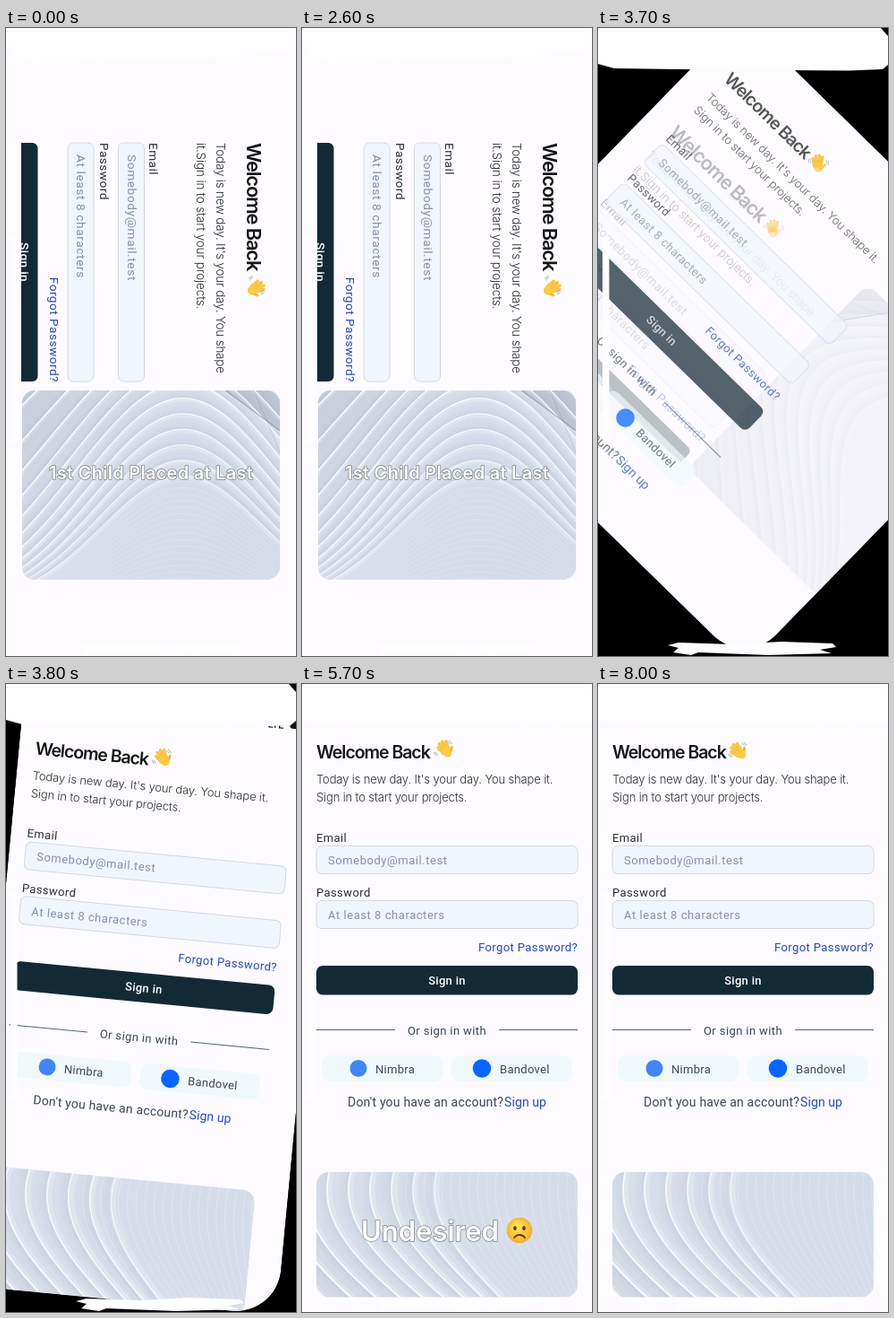
Animation, 324 px wide and 700 px high, one loop 8.1 s. Source, as an HTML page with a canvas:

```html
<!DOCTYPE html>
<html lang="en">
<head>
<meta charset="utf-8">
<title>Sign in screen rotation</title>
<style>
  html, body { margin: 0; width: 100%; height: 100%; overflow: hidden; background: #fdfbff; }
  canvas { display: block; width: 324px; height: 700px; }
</style>
</head>
<body>
<canvas id="stage"></canvas>
<script>
const W = 324, H = 700, LOOP = 8100;
const TURN_START = 3500, TURN_TIME = 400;
const canvas = document.getElementById('stage');
const dpr = window.devicePixelRatio || 1;
canvas.width = W * dpr;
canvas.height = H * dpr;
const ctx = canvas.getContext('2d');

const BG = '#fdfbff', PATCH = '#fefdff', INK = '#2b2e38', LINK = '#2449b4',
      NAVY = '#142936', HINT = '#8490a8', SLATE = '#3a465a';
const roboto = (size, weight = 400) => `${weight} ${size}px Roboto, sans-serif`;
const inter = (size, weight = 300) => `${weight} ${size}px Inter, sans-serif`;

function text(str, x, y, font, color, spacing = 0, align = 'left') {
  ctx.font = font;
  ctx.letterSpacing = spacing + 'px';
  ctx.textAlign = align;
  ctx.fillStyle = color;
  ctx.fillText(str, x, y);
}

function box(x, y, w, h, r, fill, border) {
  ctx.beginPath();
  ctx.roundRect(x, y, w, h, r);
  ctx.fillStyle = fill;
  ctx.fill();
  if (border) {
    ctx.strokeStyle = border;
    ctx.lineWidth = 1;
    ctx.stroke();
  }
}

function disc(x, y, r, fill) {
  ctx.beginPath();
  ctx.arc(x, y, r, 0, Math.PI * 2);
  ctx.fillStyle = fill;
  ctx.fill();
}

function line(x1, y1, x2, y2, width, color) {
  ctx.beginPath();
  ctx.moveTo(x1, y1);
  ctx.lineTo(x2, y2);
  ctx.lineWidth = width;
  ctx.strokeStyle = color;
  ctx.stroke();
}

function poly(points, fill) {
  ctx.beginPath();
  points.forEach(([x, y]) => ctx.lineTo(x, y));
  ctx.fillStyle = fill;
  ctx.fill();
}

function field(x, y, w, h, hint, baseline, size, spacing) {
  box(x, y, w, h, 6, '#f1f5fe', '#d3d8e4');
  text(hint, x + 13, baseline, roboto(size), HINT, spacing);
}

function hand(x, y, scale, t) {
  const sway = Math.cos(t / 433.3 * Math.PI * 2);
  ctx.save();
  ctx.translate(x + sway, y - 1.2 * sway);
  ctx.scale(scale, scale);
  ctx.save();
  ctx.translate(4, 8);
  ctx.rotate(sway * 0.16);
  ctx.translate(-4, -8);
  ctx.lineCap = 'round';
  const fingers = [[-7.4, -0.4], [-6.4, -5], [-3.4, -8], [0.8, -8.6]];
  fingers.forEach(([fx, fy], i) => {
    const px = -0.6 + i * 1.9, py = 5.6 - i * 1.7;
    line(px, py, fx, fy, 3.5, '#e9a52c');
    line(px, py, fx, fy, 2.8, '#ffc943');
  });
  line(7, 4, 8.6, -2.6, 3, '#f6b836');
  ctx.beginPath();
  ctx.ellipse(3.4, 4, 6, 5, 0.75, 0, Math.PI * 2);
  ctx.fillStyle = '#ffc943';
  ctx.fill();
  ctx.restore();
  ctx.lineCap = 'round';
  ctx.lineWidth = 0.8;
  ctx.strokeStyle = '#8b949d';
  for (const [r, from] of [[9.8, 2.3], [11.8, 2.4], [9.8, -1.05], [11.8, -0.95]]) {
    ctx.beginPath();
    ctx.arc(-0.5, 0, r, from, from + 0.4);
    ctx.stroke();
  }
  ctx.restore();
}

function frown(x, y) {
  const skin = ctx.createRadialGradient(x - 3, y - 5, 2, x, y, 15);
  skin.addColorStop(0, '#ffe45a');
  skin.addColorStop(1, '#f5ae2c');
  disc(x, y, 14.3, skin);
  for (const side of [-1, 1]) {
    ctx.beginPath();
    ctx.ellipse(x + side * 5, y - 2.5, 1.8, 2.5, 0, 0, Math.PI * 2);
    ctx.fillStyle = '#61380f';
    ctx.fill();
  }
  ctx.beginPath();
  ctx.arc(x, y + 12, 7, -Math.PI * 0.82, -Math.PI * 0.18);
  ctx.lineCap = 'round';
  ctx.lineWidth = 1.9;
  ctx.strokeStyle = '#61380f';
  ctx.stroke();
}

// Silky ribbons on a 292 x 400 sheet: each bows out from its crest
// and is squeezed towards the right-hand side.
function ribbon(start, shift, width, color) {
  ctx.beginPath();
  for (let y = 0; y <= 400; y += 5) {
    const bow = 380 * (0.8 + start / 250) * ((y - 150) / 250) ** 2;
    ctx.lineTo(330 - (330 - start) * Math.exp(-bow / 250) + shift, y);
  }
  ctx.lineWidth = width;
  ctx.strokeStyle = color;
  ctx.stroke();
}

function art() {
  const base = ctx.createLinearGradient(0, 400, 292, 60);
  base.addColorStop(0, '#c6ccd9');
  base.addColorStop(0.4, '#d9deea');
  base.addColorStop(1, '#d5dbea');
  ctx.fillStyle = base;
  ctx.fillRect(0, 0, 292, 400);
  poly([[0, 0], [62, 0], [0, 84]], 'rgba(150,158,176,.4)');
  ctx.lineCap = 'butt';
  for (let start = -132; start < 150; start += 24) {
    for (let k = 1; k < 6; k++) {
      ribbon(start, -k * 2.2, 3, `rgba(160,170,196,${0.15 - k * 0.025})`);
    }
    ribbon(start, 2.5, 6, 'rgba(255,255,255,.2)');
    ribbon(start, 0, 1.8 - start / 250, 'rgba(255,255,255,.8)');
  }
  for (let start = 90; start < 330; start += 10) {
    ribbon(start, 0, 0.9, 'rgba(255,255,255,.28)');
  }
  line(0, 84, 62, 0, 1.6, 'rgba(125,133,152,.6)');
  line(0, 40, 95, 0, 1, 'rgba(130,138,160,.4)');
}

function card(x, y, w, h, scale, offset) {
  ctx.save();
  ctx.beginPath();
  ctx.roundRect(x, y, w, h, 14);
  ctx.clip();
  ctx.translate(x, y);
  ctx.scale(scale, scale);
  ctx.translate(0, -offset);
  art();
  ctx.restore();
}

const MAIL = 'Somebody@mail.test', PASS = 'At least 8 characters';

function portrait(t) {
  text('••• LTE', 258, 28, roboto(11, 500), '#111');
  box(297, 18, 20, 9, 3, '#111');
  text('Welcome Back', 16, 83, inter(19.5, 600), '#14161c', -1.05);
  hand(158, 73, 0.95, t);
  text("Today is new day. It's your day. You shape it.", 16, 111, inter(13), INK, -0.14);
  text('Sign in to start your projects.', 16, 131, inter(13), INK, -0.14);
  text('Email', 16, 175.5, roboto(13), INK, 0.4);
  field(16, 180.5, 292, 31, MAIL, 200.5, 13, 0.55);
  text('Password', 16, 237, roboto(13), INK, 0.4);
  field(16, 241.5, 292, 31, PASS, 262, 13, 0.55);
  text('Forgot Password?', 308, 298, roboto(13), LINK, 0.4, 'right');
  box(16, 314, 292, 32.5, 7, NAVY);
  text('Sign in', 162, 335, roboto(13, 500), '#fff', 0.3, 'center');
  ctx.lineCap = 'butt';
  line(16, 385.5, 104, 385.5, 1, '#536773');
  line(220, 385.5, 308, 385.5, 1, '#536773');
  text('Or sign in with', 118, 390.5, roboto(13), SLATE, 0.4);
  box(22, 414, 135, 29, 9, '#f1f8fc');
  box(167, 414, 135, 29, 9, '#f1f8fc');
  disc(63, 428.5, 9.5, '#4285f4');
  disc(201, 428.5, 10.3, '#0866ff');
  text('Nimbra', 82, 433.5, roboto(13), SLATE, 0.3);
  text('Bandovel', 221, 433.5, roboto(13), SLATE, 0.3);
  text("Don't you have an account?", 51, 471, roboto(14), SLATE, 0.2);
  text('Sign up', 226, 471, roboto(14), LINK, 0.1);
  card(16, 544, 292, 139.5, 1, 130);
}

function landscape(t) {
  text('Welcome Back', 128, 55, inter(21.9, 600), '#14161c', -1.18);
  hand(287, 46, 0.97, t);
  text("Today is new day. It's your day. You shape", 128, 89.5, inter(13.4), INK, -0.18);
  text('it.Sign in to start your projects.', 128, 111.5, inter(13.4), INK, -0.1);
  text('Email', 128, 164, roboto(13.7), INK, 0.42);
  field(128, 169.5, 266, 29, MAIL, 188.5, 13.7, 0.6);
  text('Password', 128, 219.5, roboto(13.7), INK, 0.42);
  field(128, 226, 266, 29, PASS, 245, 13.7, 0.6);
  text('Forgot Password?', 395, 275.5, roboto(13.7), LINK, 0.45, 'right');
  ctx.save();
  ctx.beginPath();
  ctx.rect(0, 0, 700, 307);
  ctx.clip();
  box(128, 288.5, 266, 33, 6, NAVY);
  text('Sign in', 261, 308.5, roboto(13.7, 500), '#fff', 0.35, 'center');
  ctx.restore();
  card(404, 18, 211, 288, 211 / 292, 0);
}

function caption(str, x, y, size, spacing) {
  ctx.font = inter(size, 600);
  ctx.letterSpacing = spacing + 'px';
  ctx.textAlign = 'left';
  ctx.lineJoin = 'round';
  ctx.lineWidth = 1.6;
  ctx.strokeStyle = '#85878e';
  ctx.strokeText(str, x, y);
  ctx.fillStyle = '#fff';
  ctx.fillText(str, x, y);
}

function covers(t) {
  if (t < 3550) {
    poly([[0, 0], [316, 0], [316, 26], [200, 36], [30, 40], [6, 27], [5, 18], [0, 18]], PATCH);
  } else {
    poly([[0, 0], [316, 0], [324, 9], [324, 41], [318, 46], [280, 47.5], [200, 47],
          [90, 46], [18, 45], [0, 40]], PATCH);
  }
  box(5, 232, 7.5, 232, 3, PATCH);
  poly([[78, 688], [90, 685], [150, 687], [205, 684], [262, 686], [266, 690], [248, 693],
        [261, 697], [190, 699], [112, 696], [104, 699], [84, 696], [90, 691]], PATCH);
}

const clamp = v => Math.max(0, Math.min(1, v));
const ease = p => p < 0.5 ? 4 * p ** 3 : 1 - 4 * (1 - p) ** 3;

function render(t) {
  const p = clamp((t - TURN_START) / TURN_TIME);
  const k = 1 - ease(p);
  const turning = t >= 3450 && t < 3950;
  const halfW = 162 + 188 * k, halfH = 350 - 188 * k;

  ctx.setTransform(dpr, 0, 0, dpr, 0, 0);
  ctx.fillStyle = turning ? '#000' : BG;
  ctx.fillRect(0, 0, W, H);
  ctx.save();
  ctx.translate(162, 350);
  ctx.rotate(k * Math.PI / 2);
  ctx.beginPath();
  ctx.roundRect(-halfW, -halfH, halfW * 2, halfH * 2, turning ? 50 : 0);
  ctx.clip();
  ctx.fillStyle = BG;
  ctx.fill();

  const shown = clamp((p - 0.25) / 0.35);
  if (shown < 1) {
    ctx.save();
    ctx.globalAlpha = 1 - shown;
    ctx.translate(-350, -162);
    landscape(t);
    ctx.restore();
  }
  if (shown > 0) {
    const slide = 150 * k;
    ctx.save();
    ctx.globalAlpha = shown;
    ctx.translate(-162 - slide, -350 + slide);
    portrait(t);
    ctx.restore();
  }
  ctx.restore();

  covers(t);
  if (t < 3600) caption('1st Child Placed at Last', 48, 503, 20, 0.27);
  if (t >= 4600 && t < 7900) {
    caption('Undesired', 66, 620.5, 31, 0);
    frown(243, 609);
  }
}

const began = performance.now();
function tick() {
  render((performance.now() - began) % LOOP);
  requestAnimationFrame(tick);
}
tick();
</script>
</body>
</html>
```
